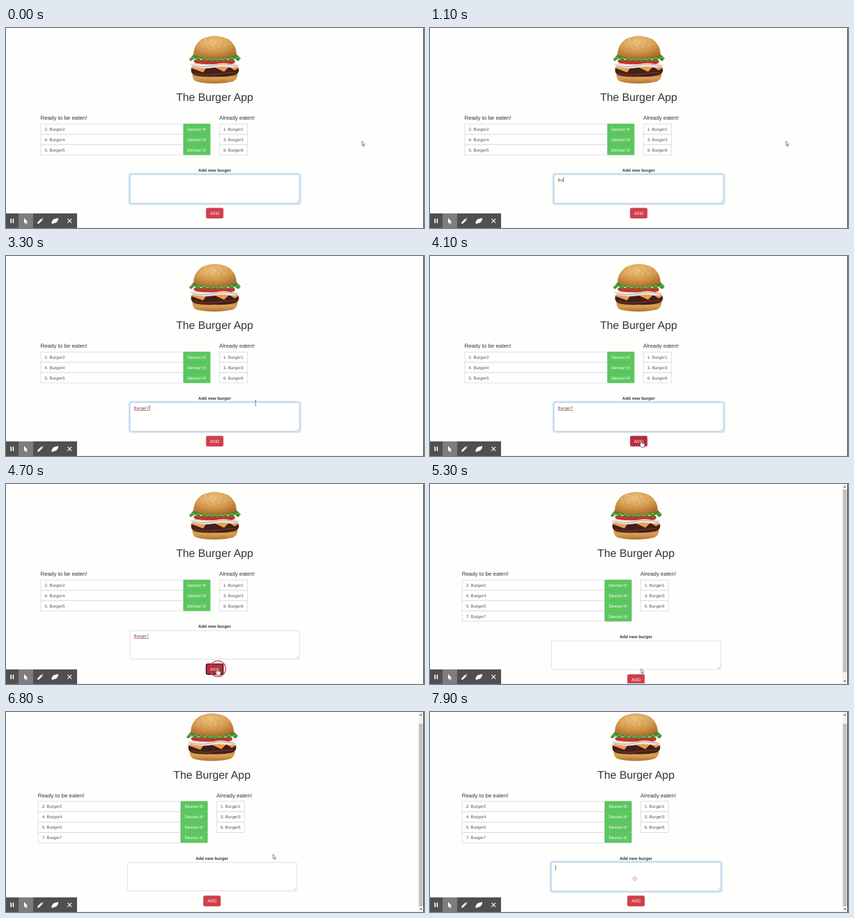
Recreate the animation shown at these times as an HTML page. Size 600x288 px, loop 8000 ms.

```html
<!DOCTYPE html>
<html lang="en">
<head>
<meta charset="utf-8">
<title>The Burger App</title>
<style>
  html, body { margin: 0; width: 100%; height: 100%; overflow: hidden; background: #fefefd; }
  svg { display: block; width: 600px; height: 288px; }
  text { font: 6.16px "Liberation Sans", Arial, sans-serif; fill: #555; text-rendering: geometricPrecision; white-space: pre; }
  .title { font-size: 15.8px; fill: #333; text-anchor: middle; }
  .head { font-size: 7.92px; fill: #333; }
  .label { font-weight: bold; fill: #333; text-anchor: middle; }
  .btn { fill: #fff; text-anchor: middle; }
  .cell { fill: #fff; stroke: #ccc; stroke-width: .6; }
</style>
</head>
<body>
<svg viewBox="0 0 600 288">
  <defs>
    <radialGradient id="bun" cx=".45" cy=".25" r=".8">
      <stop offset="0" stop-color="#e9bd78"/>
      <stop offset=".55" stop-color="#d39a4d"/>
      <stop offset="1" stop-color="#a8662a"/>
    </radialGradient>
    <linearGradient id="base" x2="0" y2="1">
      <stop offset="0" stop-color="#b97532"/>
      <stop offset=".5" stop-color="#d9a256"/>
      <stop offset="1" stop-color="#b0702f"/>
    </linearGradient>
    <filter id="blur" x="-5%" y="-20%" width="110%" height="140%"><feGaussianBlur stdDeviation="1.2"/></filter>
  </defs>

  <g id="page">
    <g id="burger">
      <path d="M268 64H332Q334 73 326 77Q314 80 299 80Q284 80 273 77Q266 73 268 64Z" fill="url(#base)"/>
      <path d="M266 58Q268 54 299 54Q332 54 334 58Q336 65 328 68Q314 71 299 70Q282 71 271 68Q264 65 266 58Z" fill="#42201a"/>
      <path d="M270 65Q284 69 298 67T330 64" fill="none" stroke="#6b3526" stroke-width="1.6"/>
      <path d="M264 57L290 53L283 64ZM294 54L322 54L313 63ZM318 54L335 57L328 61Z" fill="#eda04c"/>
      <path d="M265 52Q280 48 299 51Q320 48 335 53Q335 57 322 57Q310 54 299 57Q284 60 265 55Z" fill="#eee4df"/>
      <path d="M267 54Q283 58 298 54T332 55" fill="none" stroke="#b890a0" stroke-width=".8"/>
      <path d="M270 46H328Q331 51 323 52Q312 49 301 52Q287 53 274 51Q268 50 270 46Z" fill="#c53326"/>
      <path id="leaf" fill="#3f8a2f"/>
      <path id="vein" fill="none" stroke="#8fc15a" stroke-width="1"/>
      <path d="M269 39Q269 24 281 16Q299 7 319 16Q331 24 331 39Q319 44 300 44Q281 44 269 39Z" fill="url(#bun)"/>
      <g id="seeds" fill="#f5dfae"/>
    </g>
    <text class="title" x="299.5" y="105">The Burger App</text>
    <text class="head" x="49.6" y="132">Ready to be eaten!</text>
    <text class="head" x="306" y="132">Already eaten!</text>
    <g id="rows"></g>
    <g id="form">
      <text class="label" x="299.5" y="207">Add new burger</text>
      <rect id="glow" x="177.7" y="210.7" width="244" height="42" rx="2" fill="none" stroke="#66afe9" stroke-width="2" filter="url(#blur)"/>
      <rect id="area" class="cell" x="178.2" y="211.2" width="243" height="41" rx="1.6"/>
      <path d="M417 251L420 248M419 251L420 250" stroke="#888" stroke-width=".5"/>
      <text id="typed" x="183.6" y="220.8"></text>
      <path id="wavy" d="M183.6 222.4H205.4" stroke="#d8474a" stroke-width=".8"/>
      <rect id="caret" y="214.8" width=".7" height="7.4" fill="#444"/>
      <rect id="add" x="287.4" y="259.2" width="24.4" height="14.8" rx="1.8"/>
      <text class="btn" x="299.6" y="268.9">ADD</text>
    </g>
  </g>

  <path d="M102 287.5H599" stroke="#eee"/>
  <g id="bar">
    <rect x="592" width="7" height="288" fill="#f1f1f1"/>
    <rect id="thumb" x="592.6" y="8" width="5.8" height="263" fill="#c1c1c1"/>
    <path d="M593.7 5L595.5 2.8L597.3 5ZM593.7 283L595.5 285.2L597.3 283Z" fill="#555"/>
  </g>
  <path d="M599.5 0V288" stroke="#3a3a3a"/>

  <g id="tools">
    <rect y="267" width="102" height="21" fill="#505050"/>
    <rect x="18" y="267" width="21" height="21" fill="#7d7d7d"/>
    <g fill="#fff">
      <path d="M6.4 274.6H8V281H6.4ZM9.6 274.6H11.2V281H9.6Z"/>
      <path d="M26 273.5V281.5L27.8 280L29.2 282.8L30.4 282.2L29.1 279.5H31.3Z"/>
      <path d="M45 282L45.6 279.6L50.4 274.8L52.3 276.7L47.4 281.4ZM51 274.2L51.8 273.5L53.5 275.2L52.8 276Z"/>
      <path d="M65.6 279L68 275.5L74.8 273.6V277L72 280.3L65.6 282.2Z"/>
    </g>
    <path d="M88.4 274.8L94.2 280.6M94.2 274.8L88.4 280.6" stroke="#fff" stroke-width="1.1"/>
  </g>

  <g id="mouse">
    <path id="arrow" d="M0 0V6.4L1.4 5.2L2.4 7.4L3.3 7L2.3 4.9H4.2Z" fill="#fff" stroke="#444" stroke-width=".6"/>
    <path id="beam" d="M-1.3 -3.5H1.3M0 -3.5V3.5M-1.3 3.5H1.3" fill="none" stroke="#555" stroke-width=".6"/>
    <path id="hand" d="M-.9 0Q0 -1 .8 0V3.2L4.4 4Q5.4 4.4 5.2 6L4.4 9.4H.2L-2.4 5.6Q-2.4 4.4 -.9 5.4Z" fill="#fff" stroke="#333" stroke-width=".6"/>
  </g>
  <circle id="ring" fill="none"/>
</svg>
<script>
const $ = id => document.getElementById(id);
const set = (el, attrs) => { for (const k in attrs) el.setAttribute(k, attrs[k]); };
const show = (id, on) => set($(id), { visibility: on ? 'visible' : 'hidden' });
const move = (id, x, y) => set($(id), { transform: `translate(${x} ${y})` });

const LOOP = 8000, RELOAD = 5000, PRESS = 4300, REFOCUS = 7600;
const WORD = 'Burger7';
const KEYS = [800, 1000, 1200, 1300, 1500, 1700, 2200];
const PATH = [
  [0, 511, 163], [1600, 511, 163], [1700, 510, 163.5], [2850, 510, 163.5],
  [3100, 440, 190], [3400, 318, 222], [3550, 318, 222], [3850, 303, 266],
  [6250, 303, 266], [6500, 382, 207], [6650, 382, 207], [6800, 383.3, 205],
  [6900, 383.3, 205], [7500, 294, 240], [LOOP, 294, 240]
];

// Rows of both lists
function row(x, w, i, label, devour) {
  const y = 138.2 + i * 14.9;
  return `<g id="row${label[0]}"><rect class="cell" x="${x}" y="${y}" width="${w}" height="14.9"/>
    <text x="${x + 5.6}" y="${y + 9.6}">${label}</text>` + (devour
    ? `<rect x="${x + w}" y="${y - .2}" width="38.4" height="15" rx="1" fill="#5cc65f" stroke="#52b856" stroke-width=".4"/>
       <text class="btn" x="${x + w + 19}" y="${y + 9.6}">Devour It!</text>` : '') + '</g>';
}
const list = (ids, x, w, devour) =>
  ids.map((n, i) => row(x, w, i, `${n}. Burger${n}`, devour)).join('');
$('rows').innerHTML = list([2, 4, 5, 7], 50, 204.8, true) + list([1, 3, 6], 306.3, 40, false);

// Lettuce edge and sesame seeds
const wave = (y, a, k) => Array.from({ length: 38 }, (_, i) =>
  `${263 + i * 2} ${(y + a * Math.sin(i * k) - 2 * Math.abs(i / 18.5 - 1)).toFixed(1)}`).join('L');
set($('leaf'), { d: `M270 37L${wave(47.5, 2, 1.3).split('L').join('L')}L331 38Z` });
set($('vein'), { d: 'M' + wave(45, 1.3, 1.6) });
$('seeds').innerHTML = Array.from({ length: 24 }, (_, i) => {
  const a = i * 2.4, r = Math.sqrt(i / 24);
  return `<ellipse cx="${300 + 24 * r * Math.cos(a)}" cy="${22 + 8 * r * Math.sin(a)}" rx=".9" ry=".55"/>`;
}).join('');

function along(t) {
  const i = PATH.findIndex(p => p[0] > t);
  const [t0, x0, y0] = PATH[i - 1], [t1, x1, y1] = PATH[i];
  const u = (t - t0) / (t1 - t0);
  return [x0 + (x1 - x0) * u, y0 + (y1 - y0) * u];
}

function drawForm(t, fresh) {
  const focus = t < PRESS ? 1 : Math.min(1, Math.max(0, (t - REFOCUS) / 150));
  const count = fresh ? 0 : KEYS.filter(k => t >= k).length;
  $('typed').textContent = WORD.slice(0, count);
  const since = fresh ? t - REFOCUS : count ? t - KEYS[count - 1] : t + 700;
  show('caret', focus && since % 1000 < 500);
  set($('caret'), { x: 183.9 + (count ? $('typed').getComputedTextLength() : 0) });
  show('wavy', t >= 3000 && !fresh);
  set($('glow'), { opacity: focus * .75 });
  set($('area'), { stroke: focus > .5 ? '#66afe9' : '#ccc' });
  const pressed = t >= PRESS && !fresh, hover = t >= 3800 && !fresh;
  set($('add'), {
    fill: hover ? '#b92c3b' : '#d03f4c',
    stroke: pressed ? '#25191c' : hover ? '#a52733' : '#c23541',
    'stroke-width': pressed ? 1.3 : .5
  });
}

function drawMouse(t, fresh) {
  const [x, y] = along(t);
  const kind = t >= 7800 ? '' :
    t >= 3750 && !fresh ? 'hand' :
    (t > 3200 && t < 3700) || t > 7200 ? 'beam' : 'arrow';
  for (const k of ['arrow', 'beam', 'hand']) show(k, k === kind);
  const small = t >= 1700 && t < 2850;
  set($('arrow'), { fill: small ? '#222' : '#fff', transform: `scale(${small ? .7 : 1})` });
  move('mouse', x, y);

  const click = t >= 7800 ? t - 7800 : t - PRESS;
  const u = Math.min(1, Math.max(0, (click - 100) / 250));
  show('ring', t >= 7800 || (t >= PRESS && t < 4900));
  set($('ring'), {
    cx: x + u, cy: y, r: 2.4 + 9 * u,
    stroke: u ? '#d63a48' : '#c4c4c4', 'stroke-width': .6 + .7 * u
  });
}

function draw(t) {
  const fresh = t >= RELOAD;
  const scroll = 9.5 * Math.min(1, Math.max(0, (t - 6690) / 100));
  move('page', fresh ? -3.9 : 0, -scroll);
  move('form', 0, fresh ? 15 : 0);
  show('row7', fresh);
  show('bar', fresh);
  set($('thumb'), { y: 8 + scroll * .93 });
  drawForm(t, fresh);
  drawMouse(t, fresh);
}

const start = performance.now();
function tick() {
  draw((performance.now() - start) % LOOP);
  requestAnimationFrame(tick);
}
tick();
</script>
</body>
</html>
```
